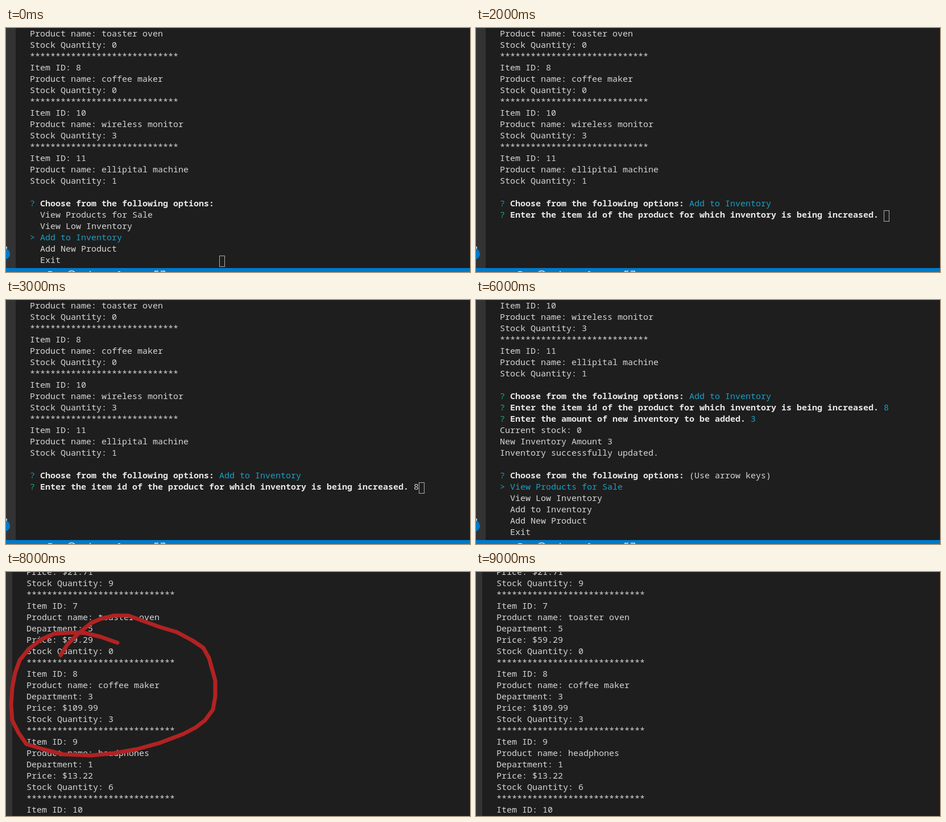
Write an HTML page that moves like this. It is 816 by 431 pixels and loops after 10 s.

```html
<!DOCTYPE html>
<html lang="en">
<head>
<meta charset="utf-8">
<title>Inventory terminal</title>
<style>
  html, body { margin: 0; width: 100%; height: 100%; overflow: hidden; background: #1e1e1e; }
  #stage { position: relative; width: 816px; height: 431px; overflow: hidden; background: #1e1e1e; }
  #stage > * { position: absolute; }
  #side { left: 0; top: 0; height: 431px; background: #333; }
  pre { margin: 0; font: 500 15px/20px "Noto Sans Mono", monospace; font-variant-ligatures: none; color: #d6d6d6; }
  b { color: #e8e8e8; }
  .cyan { color: #1a9fc4; }
  .teal { color: #1898a4; }
  .green { color: #12b078; }
  #cursor { box-sizing: border-box; width: 10px; height: 20px; border: 1px solid #b4aeac; }
  svg { left: 0; top: 0; }
</style>
</head>
<body>
<div id="stage">
  <div id="side"></div>
  <pre id="text"></pre>
  <div id="cursor"></div>
  <svg id="chrome" width="816" height="431">
    <circle cx="-3" cy="399" r="10" fill="#007acc"/>
    <path d="M0 386h2v4h-2z" fill="#b8b8b8"/>
    <path d="M0 424h816v7H0z" fill="#007acc"/>
    <path d="M74 430.5h7M110 431q5-4 11 0M148 429v2M197 430.5h4M262 431v-1.5h6M272 429.5h7v1.5"
          fill="none" stroke="#dcebf7" stroke-width="1.5"/>
  </svg>
  <svg id="mark" width="816" height="431">
    <polyline fill="none" stroke="#b22222" stroke-width="7" stroke-linecap="round" stroke-linejoin="round"
      points="96,147 108,128 130,106 150,90 166,83 190,77 215,77 240,86 270,97 300,106 328,121 347,134
              357,152 362,170 368,192 368,220 364,243 350,262 333,275 312,286 270,302 230,313 190,320
              150,324 100,322 65,313 36,304 22,284 11,262 9,235 11,205 16,178 24,156 40,136 62,119
              85,109 115,107 140,108 165,114 196,125"/>
  </svg>
</div>
<script>
const $ = id => document.getElementById(id);
const LOOP = 10000;
const LEFT = 42, CELL = 9, ROW = 20;

const paint = (color, text) => `<span class="${color}">${text}</span>`;
const stars = "*".repeat(29);
const ask = (text, answer = "", color = "green") => `${paint(color, "?")} <b>${text}</b> ${answer}`;
const lowItem = (id, name, stock) => [`Item ID: ${id}`, `Product name: ${name}`, `Stock Quantity: ${stock}`];
const saleItem = (id, name, department, price, stock) => [
  `Item ID: ${id}`, `Product name: ${name}`, `Department: ${department}`,
  `Price: $${price}`, `Stock Quantity: ${stock}`, stars
];

const options = ["View Products for Sale", "View Low Inventory", "Add to Inventory", "Add New Product", "Exit"];
const menu = chosen => options.map((option, i) =>
  i === chosen ? paint("cyan", "&gt; " + option) : "  " + option);

const lowStock = [
  ...lowItem(7, "toaster oven", 0).slice(1), stars,
  ...lowItem(8, "coffee maker", 0), stars,
  ...lowItem(10, "wireless monitor", 3), stars,
  ...lowItem(11, "ellipital machine", 1), ""
];
const choose = (answer, color) => ask("Choose from the following options:", answer, color);
const askId = answer => ask("Enter the item id of the product for which inventory is being increased.", answer);
const askAmount = answer => ask("Enter the amount of new inventory to be added.", answer);
const picked = color => choose(paint("cyan", "Add to Inventory"), color);
const typing = (...lines) => [...lowStock, picked("teal"), ...lines];
const idDone = askId(paint("cyan", "8"));

const updated = [
  ...lowStock.slice(7), picked("green"), idDone, askAmount(paint("cyan", "3")),
  "Current stock: 0", "New Inventory Amount 3", "Inventory successfully updated.", "",
  choose("(Use arrow keys)", "teal"), ...menu(0)
];
const sale = [
  "Price: $21.71", "Stock Quantity: 9", stars,
  ...saleItem(7, "toaster oven", 5, "59.29", 0),
  ...saleItem(8, "coffee maker", 3, "109.99", 3),
  ...saleItem(9, "headphones", 1, "13.22", 6),
  "Item ID: 10"
];

// cursor: [column, row]
const scenes = [
  { at: 0, lines: [...lowStock, choose("", "teal"), ...menu(2)], cursor: [37, 20] },
  { at: 2000, lines: typing(askId()), cursor: [75, 16] },
  { at: 3000, lines: typing(askId("8")), cursor: [76, 16] },
  { at: 4000, lines: typing(idDone, askAmount()), cursor: [49, 17] },
  { at: 5000, lines: typing(idDone, askAmount("3")), cursor: [50, 17] },
  { at: 6000, lines: updated },
  { at: 8000, lines: sale, list: true, mark: true },
  { at: 9000, lines: sale, list: true }
];

const show = (id, visible) => { $(id).style.display = visible ? "block" : "none"; };
const place = (id, x, y) => { $(id).style.left = x + "px"; $(id).style.top = y + "px"; };

function draw({ lines, cursor, list, mark }) {
  $("text").innerHTML = lines.join("\n");
  place("text", list ? 36 : LEFT, list ? -11 : -1);
  $("side").style.width = list ? "11px" : "17px";
  show("chrome", !list);
  show("mark", mark);
  show("cursor", cursor);
  if (cursor) place("cursor", LEFT + cursor[0] * CELL, 2 + cursor[1] * ROW);
}

let current;
const start = performance.now();
function frame() {
  const time = (performance.now() - start) % LOOP;
  const scene = scenes.findLast(s => s.at <= time);
  if (scene !== current) draw(current = scene);
  requestAnimationFrame(frame);
}
frame();
</script>
</body>
</html>
```
